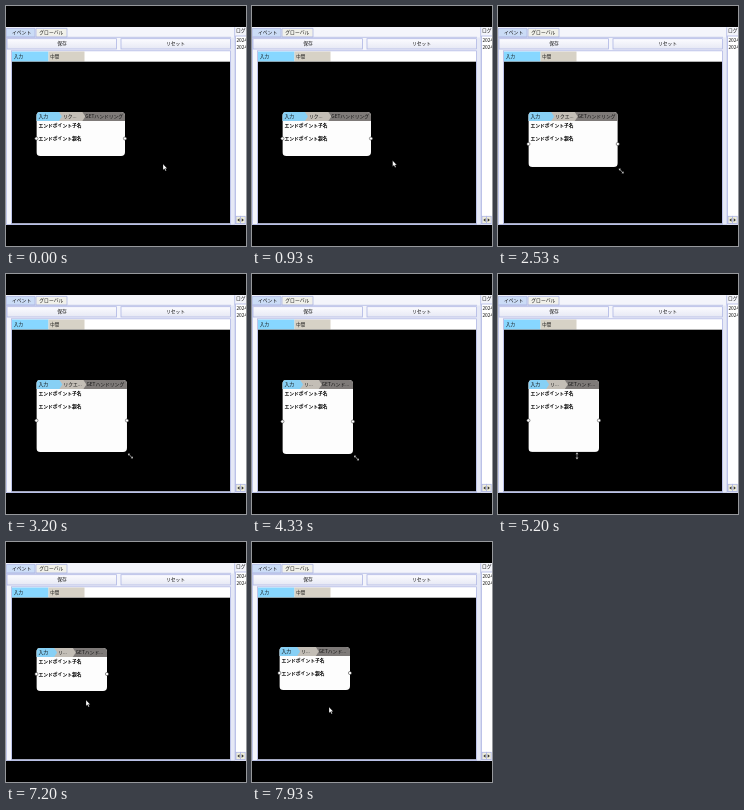
These frames come from a looping animation (240 px wide and 240 px high, 8000 ms). An HTML page:

```html
<!DOCTYPE html>
<html lang="ja">
<head>
<meta charset="utf-8">
<title>Node editor</title>
<style>
  html, body { margin: 0; width: 100%; height: 100%; overflow: hidden; background: #000; }
  svg { display: block; width: 100%; height: 100%; }
  text { font: 4.8px "Noto Sans CJK JP", "Noto Sans CJK", sans-serif; fill: #111; white-space: pre; }
  .bold { font-weight: 700; fill: #000; }
  .strong { font-weight: 500; }
  .edge { stroke: #aeb6e4; stroke-width: .8; }
</style>
</head>
<body>
<svg viewBox="0 0 240 240">
  <defs>
    <linearGradient id="button" x2="0" y2="1">
      <stop stop-color="#fcfcff"/><stop offset="1" stop-color="#e6e8f4"/>
    </linearGradient>
    <clipPath id="nodeClip"><rect id="clipRect" rx="4"/></clipPath>
  </defs>
  <rect width="240" height="240"/>
  <rect y="21" width="240" height="198" fill="#f4f5fb"/>
  <g class="edge">
    <path d="M.4 31V22.4H29V31Z" fill="#cbdcf6"/>
    <path d="M30 31V22.4H61V31Z" fill="#f1f1ea"/>
    <path d="M0 31.3H225" fill="none"/>
    <rect x="1" y="32.7" width="109.5" height="10.3" fill="url(#button)"/>
    <rect x="115" y="32.7" width="109.5" height="10.3" fill="url(#button)"/>
    <rect x="5.5" y="44.8" width="219" height="173" fill="#fff"/>
    <path d="M.4 31V218.5H228.7V21.4" fill="none"/>
  </g>
  <rect x="6" y="45.5" width="36.5" height="10" fill="#87d7ff"/>
  <rect x="42.5" y="45.5" width="36" height="10" fill="#d7d2c6"/>
  <rect x="6" y="55.7" width="218" height="161.5"/>
  <rect x="225" y="31.5" width="3.5" height="187" fill="#e6e9f6"/>
  <g class="edge" fill="#fff">
    <rect x="229.6" y="30" width="12" height="188"/>
    <rect x="230" y="210.3" width="4.6" height="7.2" fill="#eeedda"/>
    <rect x="234.6" y="210.3" width="4.6" height="7.2" fill="#eeedda"/>
  </g>
  <path d="M233.5 212.3V215.7L231.3 214ZM235.7 212.3V215.7L237.9 214Z" fill="#333"/>
  <text x="6" y="27.8">イベント</text>
  <text x="33.3" y="27.8">グローバル</text>
  <text x="56" y="39.2" text-anchor="middle">保存</text>
  <text x="169.5" y="39.2" text-anchor="middle">リセット</text>
  <text class="strong" x="8" y="52.2" style="font-size:4.4px">入力</text>
  <text class="strong" x="44.3" y="52.2" style="font-size:4.4px">中間</text>
  <text x="230" y="25.8">ログ</text>
  <text x="230.4" y="36.2">2024</text>
  <text x="230.4" y="43">2024</text>
  <g id="node"></g>
  <g id="cursor" fill="#fff" stroke="#000" stroke-width=".3"></g>
</svg>
<script>
const LOOP = 8000, FONT = 4.8, HEADER = 9;
const $ = id => document.getElementById(id);

// Progress from 0 to 1 between two times.
const span = (t, start, end) => Math.min(1, Math.max(0, (t - start) / (end - start)));
const mix = (a, b, k) => a.map((v, i) => v + (b[i] - v) * k);

const textWidth = s => FONT * [...s].reduce((sum, c) => sum + (c === '.' ? .24 : c < '~' ? .62 : 1), 0);

function ellipsize(label, room) {
  if (textWidth(label) <= room) return label;
  while (label && textWidth(label + '...') > room) label = label.slice(0, -1);
  return label + '...';
}

const text = (x, y, s, cls = 'strong') => `<text x="${x}" y="${y}" class="${cls}">${s}</text>`;

function chevron(x, y, end, color) {
  return `<path d="M${x} ${y}H${end - 1}L${end + 2} ${y + HEADER / 2}L${end - 1} ${y + HEADER}H${x}Z" fill="${color}"/>`;
}

// Three phases: drag the corner out, pull it left, then push the bottom edge up.
function nodeBox(t) {
  const grow = span(t, 2100, 3200), narrow = span(t, 3200, 4330);
  const shorten = span(t, 5150, 6000), settle = span(t, 6000, 6500), drag = span(t, 7450, 7930);
  return {
    x: 30.4 - 3 * drag,
    y: 106 - drag,
    width: 88.6 + 2 * grow - 20 * narrow,
    height: 44 + 28 * grow + 2 * narrow - 35 * shorten + 4 * settle
  };
}

// The pointer follows the edge or corner that it is holding.
function pointer(t, box) {
  const right = box.x + box.width, bottom = box.y + box.height;
  let p = mix([157, 158], [right, bottom], span(t, 500, 1500));
  p = mix(p, [right + 3.5, bottom + 4], span(t, 1900, 2100));
  p = mix(p, [79, bottom + 4], span(t, 4600, 5000));
  p = mix(p, [80, 158], span(t, 6500, 6900));
  return mix(p, [77, 165], span(t, 7250, 7930));
}

function drawNode({ x, y, width, height }) {
  const first = width * .265, second = width * .53, portY = y + (HEADER + height) / 2;
  for (const [name, value] of Object.entries({ x, y, width, height })) $('clipRect').setAttribute(name, value);
  const port = px => `<circle cx="${px}" cy="${portY}" r="1.6" fill="#fff" stroke="#222" stroke-width=".5"/>`;
  $('node').innerHTML = `<g clip-path="url(#nodeClip)">
    <rect x="${x}" y="${y}" width="${width}" height="${height}" fill="#fdfdfd"/>
    <rect x="${x}" y="${y}" width="${width}" height="${HEADER}" fill="#7e7a78"/>
    ${chevron(x, y, x + second, '#c3beb6')}${chevron(x, y, x + first, '#87d0f5')}</g>`
    + text(x + 2, y + 6.2, '入力')
    + text(x + first + 3, y + 6.2, ellipsize('リクエスト', first - 5.8))
    + text(x + second + 2, y + 6.2, ellipsize('GETハンドリング', width * .47 - 3))
    + text(x + 2, y + 15, 'エンドポイント子名', 'bold')
    + text(x + 2, y + 28, 'エンドポイント親名', 'bold')
    + port(x) + port(x + width);
}

const ARROW = '<path d="M0 0V6L1.4 4.8L2.4 7L3.4 6.5L2.4 4.4H4.2Z"/>';
const RESIZE = '<path d="M0 -3.6L1.4 -1.7H.3V1.7H1.4L0 3.6L-1.4 1.7H-.3V-1.7H-1.4Z"/>';

function drawCursor([x, y], t) {
  const diagonal = t >= 1950 && t < 4650;
  const vertical = t >= 4900 && t < 6600;
  $('cursor').setAttribute('transform', `translate(${x} ${y}) rotate(${diagonal ? -45 : 0})`);
  $('cursor').innerHTML = diagonal || vertical ? RESIZE : ARROW;
}

function render() {
  const t = performance.now() % LOOP;
  const box = nodeBox(t);
  drawNode(box);
  drawCursor(pointer(t, box), t);
  requestAnimationFrame(render);
}
render();
</script>
</body>
</html>
```
